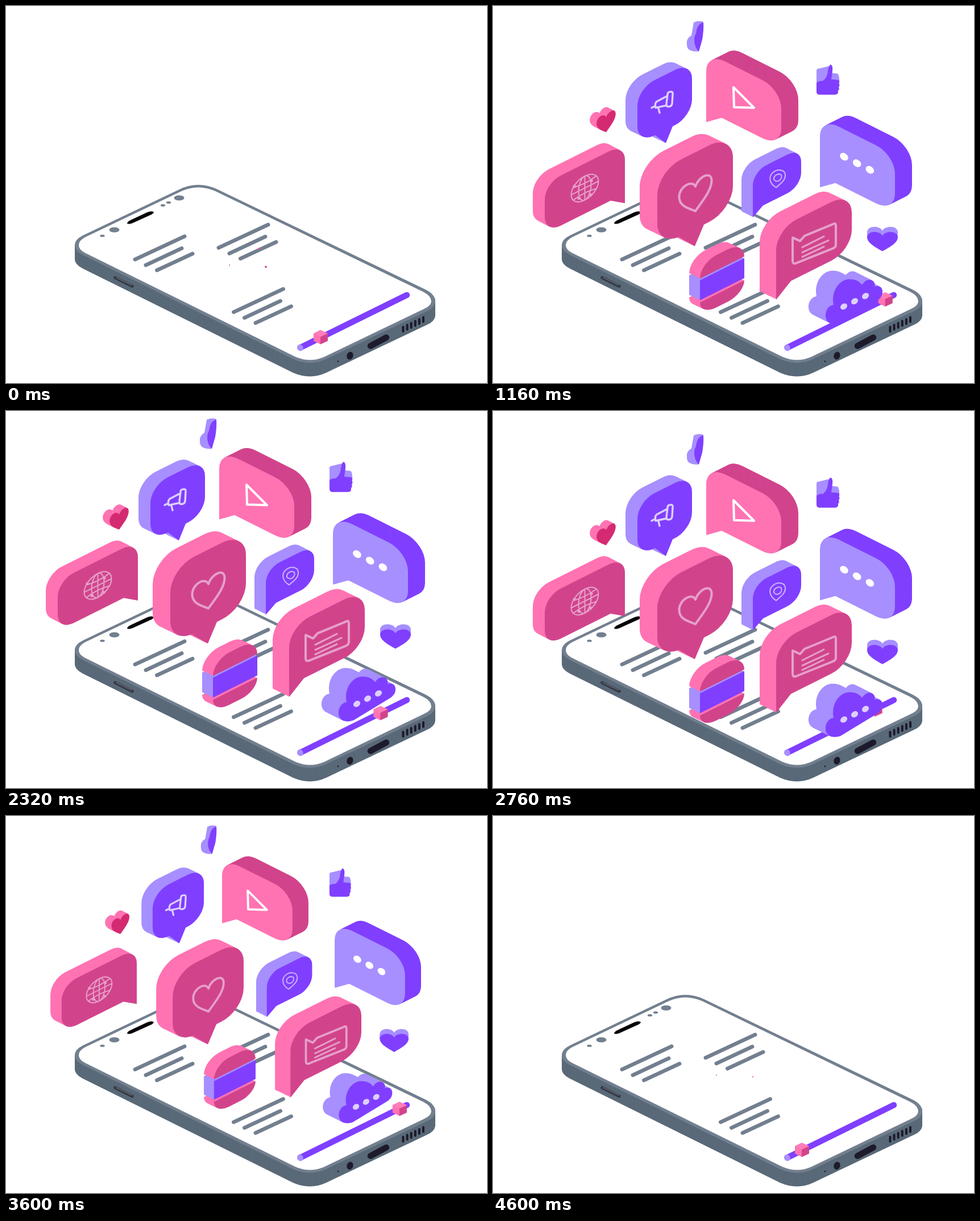
These frames come from a looping animation (846 by 662 pixels, 4.68 s). An HTML page with a canvas:

```html
<!DOCTYPE html>
<html lang="en">
<head>
<meta charset="utf-8">
<title>Isometric phone</title>
<style>
html, body { margin: 0; width: 100%; height: 100%; overflow: hidden; background: #fff; }
canvas { display: block; }
</style>
</head>
<body>
<canvas id="stage" width="846" height="662"></canvas>
<script>
const ctx = document.getElementById('stage').getContext('2d');
const LOOP = 4680;
const PINK = '#ff73b3', ROSE = '#d1448c', RED = '#d42a72', LILAC = '#a78fff', VIOLET = '#803fff';
const GRAY = '#727f8f', SLATE = '#596978', INK = '#1d1a2b', BLUSH = '#e6a0cd', MIST = '#ddd0ff';

// Cosine easing through [time, value] keys
function track(keys, t) {
  if (t <= keys[0][0]) return keys[0][1];
  for (let i = 1; i < keys.length; i++) {
    const [a, from] = keys[i - 1], [b, to] = keys[i];
    if (t < b) return from + (to - from) * (1 - Math.cos(Math.PI * (t - a) / (b - a))) / 2;
  }
  return keys[keys.length - 1][1];
}
const SIZE = [[-80, 0], [910, 1], [3396, 1], [4673, 0]];
const PULL = [[173, 1], [873, 0], [3540, 0], [4500, 1]];
const BOB = [[740, -2], [1576, 29], [2209, -2], [2842, 29], [3475, -2]];
const SLIDE = [[0, 553], [1200, 690], [2240, 658], [3500, 695], [4610, 543], [4680, 553]];

// Path drawn on a vertical plane that slopes by k
function face(x, y, k, d, sx = 1, sy = 1) {
  const p = new Path2D();
  p.addPath(new Path2D(d), new DOMMatrix([sx, k * sx, 0, sy, x, y]));
  return p;
}

// Rounded speech bubble; side: -1 tail in left corner, 0 below, 1 in right corner
function bubble(w, h, r, side, base, tip) {
  const arc = (x, y) => `A${r} ${r} 0 0 1 ${x} ${y}`;
  let d = `M${r} 0H${w - r}${arc(w, r)}`;
  d += side > 0 ? `V${tip[1]}L${base[0]} ${h}` : `V${h - r}${arc(w - r, h)}`;
  if (side === 0) d += `H${base[1]}L${tip}L${base[0]} ${h}`;
  d += side < 0 ? `H${base[0]}L0 ${tip[1]}` : `H${r}${arc(0, h - r)}`;
  return d + `V${r}${arc(r, 0)}Z`;
}

function fill(p, color) {
  ctx.fillStyle = color;
  ctx.fill(p instanceof Path2D ? p : new Path2D(p));
}
function line(p, color, width) {
  ctx.strokeStyle = color;
  ctx.lineWidth = width;
  ctx.stroke(p instanceof Path2D ? p : new Path2D(p));
}
function oval(x, y, rx, ry, color, turn = 0) {
  ctx.beginPath();
  ctx.ellipse(x, y, rx, ry, turn, 0, 7);
  ctx.fillStyle = color;
  ctx.fill();
}
// Extrude a face along (dx, dy)
function solid(p, dx, dy, side, front) {
  const n = Math.ceil(Math.max(Math.abs(dx), Math.abs(dy)));
  ctx.fillStyle = side;
  for (let i = n; i > 0; i--) {
    ctx.save();
    ctx.translate(dx * i / n, dy * i / n);
    ctx.fill(p);
    ctx.restore();
  }
  fill(p, front);
}

const HEART = 'M0 30C-10 20-28 8-28-10C-28-28-6-30 0-14C6-30 28-28 28-10C28 8 10 20 0 30Z';
const SPEECH = bubble(132, 102, 33, -1, [27], [0, 123]);
const shape = {
  globe: face(91, 298, -.5, bubble(141, 88, 28, 1, [116], [141, 105])),
  heart: face(289, 276.5, -.5, bubble(133, 134.5, 42, 0, [38, 82], [66, 164.5])),
  horn: face(254, 131.5, -.5, bubble(96, 97, 30, 0, [31, 62], [50, 120.5])),
  play: face(375, 67, .5, SPEECH),
  dots: face(575, 181.5, .5, SPEECH),
  pin: face(457, 277.5, -.5, bubble(85, 68, 24, -1, [18], [0, 80])),
  mail: face(498, 379, -.5, bubble(133, 103, 36, -1, [26], [0, 123])),
  top: face(364, 438, -.5, 'M0 27A29 27 0 0 1 29 0H49A29 27 0 0 1 78 27Z'),
  middle: face(364, 438, -.5, 'M0 30H78V65H0Z'),
  bottom: face(364, 438, -.5, 'M0 69H78A28 23 0 0 1 50 92H28A28 23 0 0 1 0 69Z'),
  cloud: new Path2D('M595 544C580 540 582 514 599 511C594 486 610 466 627 466C638 466 645 470 649 476C660 459 675 470 671 479C687 474 688 492 681 499Q678 503 672 506L611 543Q603 546 595 544Z'),
  smallHeart: face(199, 190, -.5, HEART, .6, .6),
  flatHeart: face(685, 398.5, 0, HEART, .96, .62),
  heartIcon: face(356, 317, -.5, HEART, 1.02, .98),
  globeIcon: face(161.5, 306, -.5, 'M-24 0a24 21 0 1 0 48 0a24 21 0 1 0-48 0M-11 0a11 21 0 1 0 22 0a11 21 0 1 0-22 0M-24 0H24M0-21V21M-20-11Q0-6 20-11M-20 11Q0 6 20 11')
};

function trio(x, y, dx, dy, rx, ry, turn, color) {
  for (let i = 0; i < 3; i++) oval(x + dx * i, y + dy * i, rx, ry, color, turn);
}

// Floating things: centre, painter and the point they spring from
const HUB = [457, 460];
const items = [
  [355, 40, () => {
    fill('M353 15Q362 11 370 14L368 45L362 66Q352 67 345 63Q340 60 341 48Q343 41 349 38Z', LILAC);
    fill('M357 35Q359 17 370 15Q371 28 368 45L362 66Q355 60 354 48Q354 38 357 35Z', VIOLET);
  }],
  [589, 116, () => {
    fill('M569 100Q569 96 574 96L590 92L597 104L606 105Q610 108 609 124L569 126Z', LILAC);
    fill('M569 121Q574 117 580 118Q588 112 589 101Q590 90 594 89Q598 91 597 100L595 115L607 116Q611 118 608 122Q611 125 608 129Q610 132 607 135Q608 142 601 142H575Q569 142 569 137Z', VIOLET);
  }],
  [193, 185, () => solid(shape.smallHeart, -12, -6, PINK, RED)],
  [685, 396, () => solid(shape.flatHeart, 0, -9, LILAC, VIOLET)],
  [291, 156, () => {
    solid(shape.horn, -21, -10, LILAC, VIOLET);
    line('M305 145L288 154Q284 157 286 165L305 161M285 162L279 165M291 166L293 174M307 142Q307 137 312 137Q317 136 316 142L315 158Q314 163 309 163Q305 164 305 158Z', MIST, 3.4);
  }],
  [456, 143.5, () => {
    solid(shape.play, 30, -15, ROSE, PINK);
    line('M423 129L459 165L424 164Z', '#fff', 4);
  }],
  [656, 258, () => {
    solid(shape.dots, 30, -15, VIOLET, LILAC);
    trio(617.5, 251, 22.7, 11.5, 8, 6, .65, '#fff');
  }],
  [151, 301, () => {
    solid(shape.globe, -21, -11, PINK, ROSE);
    line(shape.globeIcon, BLUSH, 2);
    [[143, 303], [173, 293], [172, 318], [151, 324]].forEach(([x, y]) => oval(x, y, 2.6, 2.6, BLUSH));
  }],
  [489.5, 295.5, () => {
    solid(shape.pin, -20, -10, LILAC, VIOLET);
    line('M498 305C486 298 484 286 492 279C501 271 513 274 514 282C515 292 507 297 498 305ZM494 291C493 284 502 279 507 283C510 290 500 299 494 291Z', '#cdb5ff', 2);
  }],
  [340, 309.5, () => {
    solid(shape.heart, -31, -15, PINK, ROSE);
    line(shape.heartIcon, BLUSH, 4);
  }, [445, 428]],
  [619.5, 497, () => {
    solid(shape.cloud, -30, -15, LILAC, VIOLET);
    trio(617, 514, 19, -9.2, 6.5, 5, -.6, MIST);
  }],
  [550, 407, () => {
    solid(shape.mail, -29, -14, PINK, ROSE);
    line('M527 393L540 399L548 390L599 369Q603 367 603 372V405Q603 410 598 412L533 438Q527 440 527 434Z', BLUSH, 4);
    line('M544 410L582 391M544 419L590 398M544 427L582 409', BLUSH, 3);
  }],
  [393, 459, () => {
    solid(shape.bottom, -19, -9, PINK, ROSE);
    solid(shape.middle, -19, -9, LILAC, VIOLET);
    solid(shape.top, -19, -9, PINK, ROSE);
  }, [393, 457]]
];

const BODY = new Path2D('M121 420Q121 410 135 403L305 322Q338 306 372 322L738 498Q756 507 755 520Q754 530 740 536L563 620Q535 633 505 620L135 437Q121 430 121 420Z');
const SCREEN = new Path2D('M128 420Q128 412 139 406L309 325Q338 312 368 325L734 502Q748 509 748 519Q747 527 735 532L560 616Q535 627 509 616L140 434Q128 428 128 420Z');

function phone() {
  solid(BODY, 0, 24, SLATE, GRAY);
  fill(SCREEN, '#fff');
  for (const [x, y, r] of [[190.5, 393, 9], [169.5, 403.5, 4.2], [304.5, 337, 9], [286, 345, 4.2], [276, 350, 4.2]])
    oval(x, y, r, r * .5, GRAY);
  fill('M213 382Q213 379 219 376L249 362Q257 359 260 362Q259 365 254 367L223 381Q217 384 213 382Z', '#060408');
  for (const [x, y] of [[0, 0], [147, -20.5], [173.5, 92.5]]) {
    ctx.save();
    ctx.translate(x, y);
    line('M227 445L314 404.5M246 455L309 425.5M265.5 464L328 435', GRAY, 6.8);
    ctx.restore();
  }
  line('M192 477L222 492', '#343944', 5.5);
  line('M194 477L221 490', '#59606c', 2);
  oval(584, 624, 1.3, 1.3, INK);
  oval(605, 614, 5.5, 7, INK, .35);
  line('M641 597L669 582', INK, 10.5);
  for (let i = 0; i < 6; i++) {
    const x = 698.5 + i * 7.1, y = 563.5 - i * 3.4;
    line(`M${x} ${y}v8`, INK, 4);
  }
}

function slider(x) {
  line('M517.5 600L705 507.5', VIOLET, 10.5);
  oval(517.5, 600, 5, 6, LILAC, -.5);
  ctx.save();
  ctx.translate(x, 581 - (x - 553) * .485);
  fill('M0-12L13-6V7L0 13L-12 7V-6Z', PINK);
  fill('M0-12L13-6L0 0L-12-6Z', '#ff7db8');
  fill('M0 0L13-6V7L0 13Z', ROSE);
  ctx.restore();
}

function draw(now) {
  const t = now % LOOP;
  const size = track(SIZE, t), pull = track(PULL, t), bob = track(BOB, t);
  ctx.clearRect(0, 0, 846, 662);
  ctx.lineCap = ctx.lineJoin = 'round';
  phone();
  slider(track(SLIDE, t));
  for (const [x, y, paint, home = HUB] of items) {
    ctx.save();
    ctx.translate(x + (home[0] - x) * pull, y + (home[1] - y) * pull + bob);
    ctx.scale(size, size);
    ctx.translate(-x, -y);
    paint();
    ctx.restore();
  }
}

const start = performance.now();
function tick() {
  draw(performance.now() - start);
  requestAnimationFrame(tick);
}
tick();
</script>
</body>
</html>
```
